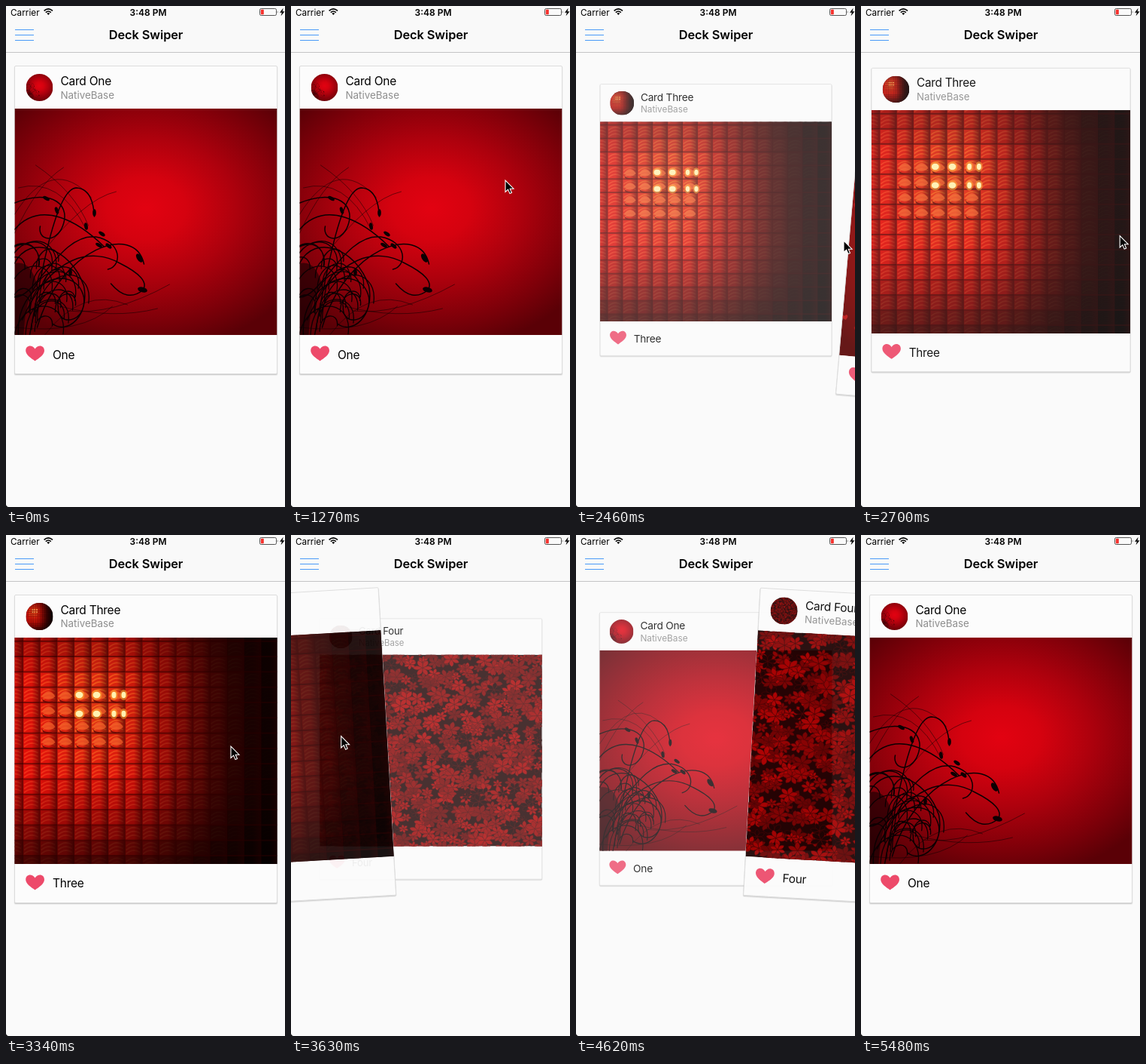
Write an HTML page that moves like this. It is 371 px wide and 664 px high and loops after 6.02 s.

```html
<!DOCTYPE html>
<html lang="en">
<head>
<meta charset="utf-8">
<title>Deck Swiper</title>
<style>
  html, body { margin: 0; width: 100%; height: 100%; overflow: hidden; background: #fafafa; }
  svg { display: block; width: 100%; height: 100%; font-family: Inter, Roboto, sans-serif; }
  .name { font-size: 15.5px; letter-spacing: -.25px; }
</style>
</head>
<body>
<svg id="stage" viewBox="0 0 371 664">
  <defs>
    <clipPath id="photo"><rect width="349" height="300"/></clipPath>
    <clipPath id="dot"><circle cx="44.5" cy="108" r="18"/></clipPath>
    <radialGradient id="glow" gradientUnits="userSpaceOnUse" cx="0" cy="0" r="1" gradientTransform="translate(175 132) scale(240 188)">
      <stop offset="0" stop-color="#e20211"/><stop offset=".22" stop-color="#d5020f"/>
      <stop offset=".5" stop-color="#ad010d"/><stop offset=".8" stop-color="#7c0009"/>
      <stop offset="1" stop-color="#5a0006"/>
    </radialGradient>
    <radialGradient id="velvet" gradientUnits="userSpaceOnUse" cx="0" cy="0" r="1" gradientTransform="translate(170 135) scale(235 205)">
      <stop offset="0" stop-color="#cf0000"/><stop offset=".4" stop-color="#b30000"/>
      <stop offset=".75" stop-color="#800000"/><stop offset="1" stop-color="#560000"/>
    </radialGradient>
    <linearGradient id="bevel">
      <stop offset="0" stop-color="#200" stop-opacity="0"/><stop offset=".5" stop-color="#200" stop-opacity=".05"/>
      <stop offset="1" stop-color="#200" stop-opacity=".6"/>
    </linearGradient>
  </defs>
  <rect width="371" height="664" fill="#fafafa"/>
  <g id="deck"></g>
  <g id="header">
    <rect width="371" height="61" fill="#f9f9f9"/>
    <path d="M0 61.5H371" stroke="#c4c4c6"/>
    <path d="M12 31.5H37M12 38.5H37M12 45.5H37" stroke="#4a9af8"/>
    <text x="6" y="12.5" font-size="11.8">Carrier</text>
    <g fill="none" stroke="#000" stroke-width="1.6">
      <path d="M50.6 6.4Q56.3 1.4 62 6.4M52.8 8.6Q56.3 5.4 59.8 8.6"/>
      <path d="M54.3 9.8Q56.3 8.2 58.3 9.8L56.3 12z" fill="#000" stroke="none"/>
    </g>
    <text x="189" y="12.5" font-size="12" font-weight="600" text-anchor="middle">3:48 PM</text>
    <rect x="337.5" y="3.5" width="22" height="9" rx="1.8" fill="none" stroke="#555"/>
    <rect x="338.8" y="4.8" width="4" height="6.4" rx=".6" fill="#f5302c"/>
    <path d="M360.8 6.2q1.6 1.8 0 3.6z" fill="#555"/>
    <path d="M368.6 2.8L364 8.7h2.8l-1.2 4.6 4.9-6h-2.9z"/>
    <text x="186" y="43.5" font-size="16.4" font-weight="600" letter-spacing="-.1" text-anchor="middle">Deck Swiper</text>
  </g>
  <path d="M0 660.5Q.4 663.6 3.5 664H0z"/>
  <path id="cursor" d="M0 0V15.4L3.6 12.1 6 17.6 8.5 16.5 6.2 11.2H11z" stroke="#fff" stroke-width="1.1"/>
</svg>
<script>
const LOOP = 6020;
const HEART = 'M0 .9C-.4 .6-1 .2-1-.3C-1-.95-.3-1.05 0-.5C.3-1.05 1-.95 1-.3C1 .2.4 .6 0 .9z';
const $ = id => document.getElementById(id);
const clamp = (v, lo = 0, hi = 1) => Math.min(hi, Math.max(lo, v));
const smooth = p => p * p * (3 - 2 * p);
const rgb = (...c) => `rgb(${c.map(v => Math.round(clamp(v, 0, 255)))})`;
const repeat = (n, draw) => Array.from({ length: n }, (_, i) => draw(i)).join('');

function seeded(seed) {
  return (lo = 0, hi = 1) => {
    seed = (seed * 16807) % 2147483647;
    return lo + (hi - lo) * seed / 2147483647;
  };
}

function swirls() {
  const rnd = seeded(77);
  const stems = [
    'M20 300C35 220 55 105 82 105Q104 106 106 143',
    'M0 250C30 250 60 165 108 170C142 176 144 208 124 213',
    'M10 280C50 190 105 185 140 205Q180 225 171 240Q150 258 128 232',
    'M30 290C60 185 160 150 172 206',
    'M0 205C20 165 75 185 92 235C100 275 70 300 50 285',
    'M0 125C50 105 78 128 62 160C50 180 30 172 34 156',
    'M0 160C35 120 85 150 118 182',
    'M5 300C0 230 80 200 92 250C96 285 55 290 58 262'
  ];
  const wisps = [
    'M70 268Q130 275 206 233', 'M60 262Q130 280 190 265', 'M0 165Q30 100 65 78',
    'M28 75Q80 110 98 155', 'M0 140Q50 60 102 118', 'M5 105Q60 90 95 160',
    'M30 200Q90 120 135 110', 'M0 290Q90 300 130 262', 'M40 300Q90 235 150 260'
  ];
  const buds = [[106, 138, 90], [95, 156, 80], [116, 166, 35], [125, 182, 40], [166, 198, 55],
    [170, 240, 15], [74, 217, 90], [56, 135, 70], [112, 181, 30], [42, 119, 30]];
  const tangle = repeat(26, () => {
    const x = rnd(0, 70), y = rnd(195, 285), r = rnd(12, 38);
    return `M${x - r} ${y + r}C${x - r} ${y - r} ${x + r} ${y - r} ${x + r * .8} ${y + r * .4}`;
  });
  return `<g fill="none" stroke="#0c0002" stroke-linecap="round">
    <path d="${stems.join('')}" stroke-width="1.5"/>
    <path d="${wisps.join('')}" stroke-width=".7" opacity=".75"/>
    <path d="${tangle}" stroke-width="1.3"/></g>
    <path d="M0 205Q22 200 30 235Q14 250 12 300H0z" fill="#0c0002" opacity=".55"/>` +
    buds.map(([x, y, a], i) =>
      `<ellipse rx="${i > 3 && i < 6 ? 6.5 : 4.8}" ry="${i > 3 && i < 6 ? 3.4 : 2.3}" transform="translate(${x} ${y}) rotate(${a})" fill="#0c0002"/>`).join('');
}

function hearts() {
  const rnd = seeded(4021);
  const put = (size, style) =>
    `<path d="${HEART}" transform="translate(${rnd(0, 349)} ${rnd(0, 300)}) rotate(${rnd(-45, 45)}) scale(${size})" ${style}/>`;
  return repeat(190, () => put(rnd(1.6, 5), `fill="#e81616" opacity="${rnd(.3, .8)}"`)) +
    repeat(34, () => put(rnd(5, 9), `fill="none" stroke="#e63030" stroke-width=".14" opacity="${rnd(.4, .8)}"`)) +
    repeat(6, () => put(rnd(6, 8), 'fill="#f01212" opacity=".8"'));
}

function tiles() {
  const w = 22.6, h = 20.3;
  const cells = repeat(17 * 16, i => {
    const c = i % 17, r = Math.floor(i / 17), x = c * w - 11, y = r * h - 14.6;
    const side = Math.exp(-((Math.max(0, x - 115) / 128) ** 2));
    const light = side * (1 - .68 * clamp((y - 170) / 115) ** 1.3) * (.75 + .25 * clamp(y / 50));
    const hot = Math.exp(-(((x - 95) / 65) ** 2 + ((y - 85) / 80) ** 2));
    const grain = [3, 8, 13].map(k => `M${x + 1} ${y + k + 4}Q${x + w * .45} ${y + k - 4} ${x + w - 3} ${y + k + 2}`).join('');
    return `<rect x="${x}" y="${y}" width="${w}" height="${h}" fill="${rgb(228 * light, (12 + 40 * hot) * light, (8 + 12 * hot) * light)}"/>
      <path d="${grain}" fill="none" stroke="${rgb(262 * light, (62 + 75 * hot) * light, 34 * light)}" stroke-width="1.8" opacity=".6"/>
      <rect x="${x}" y="${y}" width="${w}" height="${h}" fill="url(#bevel)"/>
      <path d="M${x} ${y + h - .8}h${w}" stroke="#2a0000" stroke-width="2.2" opacity=".5"/>`;
  });
  const lens = repeat(20, i => {
    const x = 45 + i % 5 * w, y = 76 + Math.floor(i / 5) * h;
    return `<path d="M${x - 9} ${y + 2}Q${x} ${y - 12} ${x + 9} ${y + 2}Q${x} ${y + 10} ${x - 9} ${y + 2}" fill="#f4602a" opacity=".7"/>
      <path d="M${x - 10} ${y + 2}q3 9 17 6q-8 4-14 1z" fill="#5a0805" opacity=".8"/>`;
  });
  const sparks = repeat(8, i => {
    const x = 86 + [0, 23, 46, 59][i % 4], y = i < 4 ? 76 : 101, rx = i % 4 < 2 ? 5 : 3;
    return `<ellipse cx="${x}" cy="${y}" rx="${rx + 2}" ry="7" fill="#ffa02c" opacity=".6"/>
      <ellipse cx="${x}" cy="${y}" rx="${rx}" ry="4.2" fill="#fff2b0"/>`;
  });
  return cells + lens + sparks;
}

function flowers() {
  const rnd = seeded(91357);
  return repeat(26 * 23, i => {
    const x = i % 26 * 14 + rnd(-9, 9), y = Math.floor(i / 26) * 14 + rnd(-9, 9);
    const r = rnd(7, 16), turn = rnd(0, 6.3);
    const petals = repeat(6, k => {
      const a = turn + k * 1.05;
      const at = (d, s) => `${(x + Math.cos(a + s) * d).toFixed(1)} ${(y + Math.sin(a + s) * d * .85).toFixed(1)}`;
      return `M${at(0, 0)}Q${at(r * .8, -.65)} ${at(r, 0)}Q${at(r * .8, .65)} ${at(0, 0)}`;
    });
    const dark = rnd() < .1;
    return `<path d="${petals}" fill="${dark ? '#180000' : rgb(rnd(95, 172), 0, 0)}" stroke="#4a0000" stroke-width=".5"/>`;
  });
}

const fill = paint => `<rect width="349" height="300" fill="${paint}"/>`;
const deck = [
  ['One', fill('url(#glow)') + swirls()],
  ['Two', fill('url(#velvet)') + hearts()],
  ['Three', fill('#200') + tiles()],
  ['Four', fill('#1c0000') + flowers()]
];

$('deck').innerHTML = deck.map(([word, art], i) => `<g id="card${i}">
  <rect x="10.5" y="80" width="351" height="410" rx="2.5" opacity=".05"/>
  <rect x="11" y="80" width="350" height="409" rx="2" opacity=".13"/>
  <rect x="11.5" y="79.5" width="349" height="408" rx="1.5" fill="#fcfcfc" stroke="#dcdcdc"/>
  <g transform="translate(11.5 136)"><g id="art${i}" clip-path="url(#photo)">${art}</g></g>
  <g clip-path="url(#dot)"><use href="#art${i}" transform="translate(26.5 90) scale(${36 / 349} .12)"/></g>
  <text class="name" x="72.5" y="105">Card ${word}</text>
  <text x="72.5" y="122.5" font-size="13.4" fill="#8e8e8e">NativeBase</text>
  <path d="${HEART}" transform="translate(38.6 460.2) scale(12.4 11.4)" fill="#ed4a6a"/>
  <text class="name" x="62" y="467.5">${word}</text>
</g>`).join('');
const cards = deck.map((_, i) => $('card' + i));

// Pointer path: time, x, y
const path = [
  [0, 385, 262], [119, 385, 262], [120, 360, 258], [210, 352, 254], [560, 352, 254],
  [910, 315, 232], [1269, 315, 232], [1270, 285, 231], [1310, 285, 231], [1750, 26, 226],
  [2030, 41, 223], [2080, 41, 223], [2430, 356, 311], [2520, 356, 311], [3100, 305, 283],
  [3220, 305, 283], [3330, 299, 280], [3370, 299, 280], [3720, 22, 264], [3800, 30, 266],
  [4160, 256, 283], [4340, 256, 283], [4390, 265, 283], [4590, 400, 300], [4650, 400, 302],
  [4900, 317, 319], [4960, 317, 319], [5480, 271, 668], [LOOP, 271, 668]
];

const swipes = [
  { press: 1310, release: 1750, swap: 1810, x: 285, fling: [-45, 0] },
  { press: 2080, release: 2430, swap: 2515, x: 41, fling: [51, 60] },
  { press: 3370, release: 3720, swap: 3805, x: 299, fling: [-45, 0] },
  { press: 4340, release: 4590, swap: 4650, x: 256, fling: [110, 0] }
];

function pointer(t) {
  const i = path.findIndex(k => k[0] > t), [t0, x0, y0] = path[i - 1], [t1, x1, y1] = path[i];
  const p = smooth((t - t0) / (t1 - t0));
  return [x0 + (x1 - x0) * p, y0 + (y1 - y0) * p];
}

function settle(ms) {
  const s = ms / 1000;
  return 1 - .1 * Math.exp(-12.5 * s) * (Math.cos(8.6 * s) + 1.45 * Math.sin(8.6 * s));
}

function pose(card, dx, dy, scale, opacity) {
  card.setAttribute('transform', `translate(${186 + dx} ${283.5 + dy}) rotate(${dx / 70}) scale(${scale}) translate(-186 -283.5)`);
  card.setAttribute('opacity', opacity);
}

let shown = -1;
function render(t) {
  const done = swipes.filter(s => t >= s.swap).length;
  const front = done % 4, back = (done + 1) % 4, swipe = swipes[done];
  if (front !== shown) {
    $('deck').append(cards[back], cards[front]);
    shown = front;
  }
  let dx = 0, dy = 0;
  const dragging = swipe && t > swipe.press;
  if (dragging) {
    const glide = 1 - Math.exp(-Math.max(0, t - swipe.release) * .04);
    dx = pointer(Math.min(t, swipe.release))[0] - swipe.x + swipe.fling[0] * glide;
    dy = swipe.fling[1] * glide;
    const p = (t - swipe.press) / (swipe.swap - swipe.press);
    pose(cards[back], 0, 0, .8 + .1 * p ** 1.5, .8);
  }
  cards.forEach((c, i) => c.style.display = i === front || (dragging && i === back) ? '' : 'none');
  const age = done ? t - swipes[done - 1].swap : 1e4;
  const fade = .8 + .2 * smooth(clamp(age / 350));
  pose(cards[front], dx, dy, settle(age), fade * (1 - .1 * clamp(Math.abs(dx) / 320)));
  $('cursor').setAttribute('transform', `translate(${pointer(t).join(' ')})`);
}

const start = performance.now();
function tick() {
  render((performance.now() - start) % LOOP);
  requestAnimationFrame(tick);
}
tick();
</script>
</body>
</html>
```
